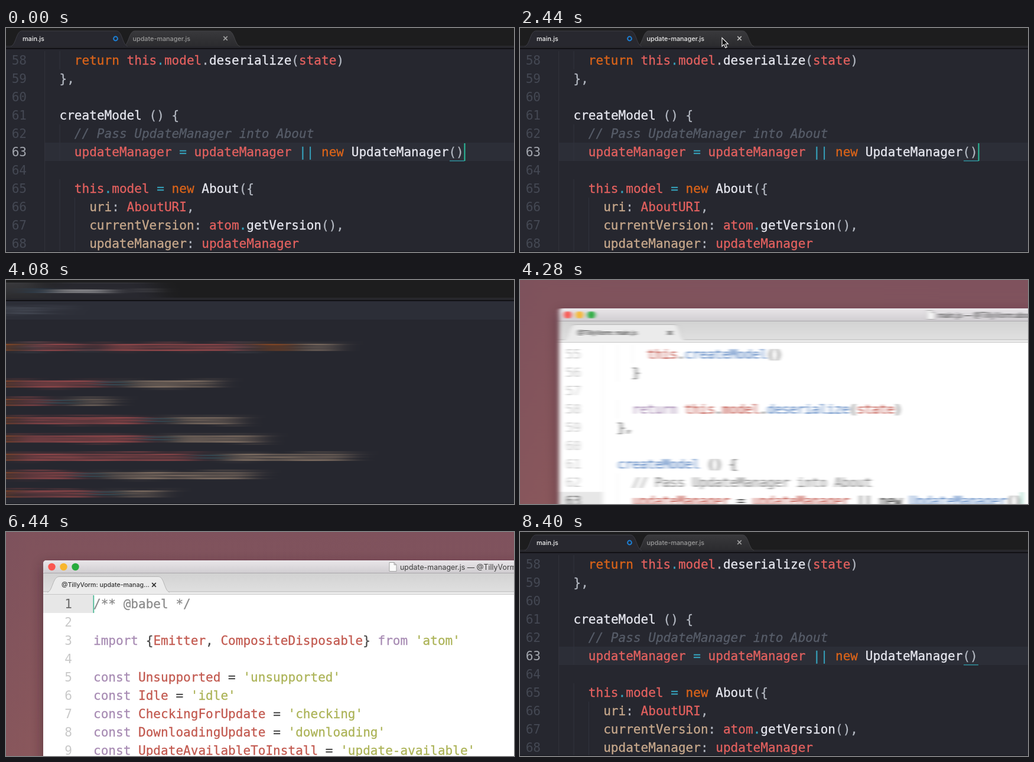
Animation of 860 by 379 pixels, one loop 8.44 s. Source, as an HTML page:

```html
<!DOCTYPE html>
<html lang="en">
<head>
<meta charset="utf-8">
<title>Following a collaborator between files</title>
<style>
  html, body { margin: 0; width: 100%; height: 100%; overflow: hidden; background: #26272f; }
  svg { display: block; width: 860px; height: 379px; }
  text { white-space: pre; }
  .code { font: 21.05px "DejaVu Sans Mono", monospace; stroke-width: .3px; }
  .ui { font-family: Inter, "Noto Sans", sans-serif; }
</style>
</head>
<body>
<svg id="stage" viewBox="0 0 860 379" xmlns="http://www.w3.org/2000/svg">
  <defs>
    <filter id="motion" filterUnits="userSpaceOnUse" x="-200" y="0" width="1260" height="379" color-interpolation-filters="sRGB">
      <feGaussianBlur id="blur" stdDeviation="0 0"/>
    </filter>
    <filter id="shadow" filterUnits="userSpaceOnUse" x="0" y="0" width="1100" height="460">
      <feGaussianBlur stdDeviation="10"/>
    </filter>
    <linearGradient id="wall">
      <stop offset="0" stop-color="#6b4e63"/><stop offset=".12" stop-color="#7a505d"/>
      <stop offset=".24" stop-color="#87565c"/><stop offset="1" stop-color="#86555e"/>
    </linearGradient>
    <linearGradient id="wallTop" x2="0" y2="1">
      <stop offset="0" stop-color="#6d4a5c" stop-opacity=".3"/><stop offset="1" stop-color="#8f5a5b" stop-opacity=".3"/>
    </linearGradient>
    <linearGradient id="title" x2="0" y2="1">
      <stop offset="0" stop-color="#e9e6e9"/><stop offset="1" stop-color="#cfccd0"/>
    </linearGradient>
    <linearGradient id="tabBar" x2="0" y2="1">
      <stop offset="0" stop-color="#d2d2d2"/><stop offset="1" stop-color="#e0e0e0"/>
    </linearGradient>
    <linearGradient id="idleTab" x2="0" y2="1">
      <stop offset="0" stop-color="#39393c"/><stop offset="1" stop-color="#2b2b2e"/>
    </linearGradient>
  </defs>
  <g id="lens"><g id="world">
    <g id="dark"></g>
    <g id="light"></g>
  </g></g>
  <path id="pointer" d="M0 0V14.5L3.4 11.4L5.8 17L8.3 15.9L5.9 10.5H10.4Z" fill="#111" stroke="#fff" stroke-width="1.1"/>
</svg>
<script>
const LOOP = 8440, PAN = 1400, PAN_TIME = 260, SHUTTER = 15;
const LEAVE = 4029, RETURN = 8006, CLICK = 2760, FOLLOW = 5600;
const CHAR = 12.667, ROW = 31;
const $ = id => document.getElementById(id);

function add(parent, tag, attrs = {}, text) {
  const el = document.createElementNS("http://www.w3.org/2000/svg", tag);
  for (const key in attrs) el.setAttribute(key, attrs[key]);
  if (text != null) el.textContent = text;
  return parent.appendChild(el);
}
const rect = (g, x, y, width, height, fill, more) => add(g, "rect", { x, y, width, height, fill, ...more });
const label = (g, x, y, size, fill, text, more) =>
  add(g, "text", { x, y, fill, "font-size": size, class: "ui", ...more }, text);
const cross = (g, x, y, stroke) =>
  add(g, "path", { d: `M${x - 3.3} ${y - 3.3}l6.6 6.6m0-6.6l-6.6 6.6`, stroke, "stroke-width": 1.7 });

// k keyword, n new, r variable, o operator, p punctuation, f function, c comment, s string or key
const darkTheme = { k: "#dc6419", n: "#dc6419", r: "#e4615f", o: "#36a3bd", p: "#b4b9c2", f: "#e8e9f1",
  c: "#575d69", s: "#c8a98c", number: "#444853", current: "#a3a6ae", guide: "#33353e", italic: true };
const lightTheme = { k: "#a78bb3", n: "#3c3c3c", r: "#c2594f", o: "#4a4a4a", p: "#4a4a4a", f: "#5b86c2",
  c: "#8b8b8b", s: "#acb357", number: "#c9c9c9", current: "#6a6a6a", guide: "#efefef" };

const mainFile = {
  55: "      ~rthis~o.~fcreateModel~p()",
  56: "    ~p}",
  57: "",
  58: "    ~kreturn ~rthis~o.~rmodel~p.~fdeserialize~p(~rstate~p)",
  59: "  ~p},",
  60: "",
  61: "  ~fcreateModel ~p() {",
  62: "    ~c// Pass UpdateManager into About",
  63: "    ~rupdateManager ~o= ~rupdateManager ~o|| ~nnew ~fUpdateManager~p()",
  64: "",
  65: "    ~rthis~o.~rmodel ~o= ~nnew ~fAbout~p({",
  66: "      ~suri~p: ~rAboutURI~p,",
  67: "      ~scurrentVersion~p: ~ratom~o.~fgetVersion~p(),",
  68: "      ~supdateManager~p: ~rupdateManager"
};
const constant = (name, value) => `~kconst ~r${name} ~o= ~s'${value}'`;
const updateFile = {
  1: "~c/** @babel */",
  2: "",
  3: "~kimport ~p{~rEmitter~p, ~rCompositeDisposable~p} ~kfrom ~s'atom'",
  4: "",
  5: constant("Unsupported", "unsupported"),
  6: constant("Idle", "idle"),
  7: constant("CheckingForUpdate", "checking"),
  8: constant("DownloadingUpdate", "downloading"),
  9: constant("UpdateAvailableToInstall", "update-available"),
  10: constant("UpToDate", "no-update-available"),
  11: constant("ErrorState", "error")
};

function drawCode(g, file, theme, { first, last, x, gutter, y, current }) {
  for (let n = first; n <= last; n++) {
    const base = y + (n - first) * ROW;
    const numberColor = n === current ? theme.current : theme.number;
    add(g, "text", { x: gutter, y: base, "text-anchor": "end", class: "code", fill: numberColor, stroke: "none" }, n);
    const [indent, ...tokens] = file[n].split("~");
    const depth = file === mainFile ? Math.max(1, indent.length / 2) : 0;
    for (let i = 0; i < depth; i++) rect(g, x + i * 2 * CHAR, base - 23, 1, ROW, theme.guide);
    const line = add(g, "text", { x: x + indent.length * CHAR, y: base, class: "code" });
    for (const token of tokens) {
      const kind = token[0], color = theme[kind];
      const span = add(line, "tspan", { fill: color, stroke: color }, token.slice(1));
      if (kind === "c" && theme.italic) span.setAttribute("font-style", "italic");
    }
  }
}

function darkTab(g, x, right, text, active) {
  add(g, "path", {
    d: `M${x} 31C${x + 9} 29 ${x + 9} 5 ${x + 19} 5H${right - 19}C${right - 9} 5 ${right - 9} 29 ${right} 31`,
    fill: active ? "#28282f" : "url(#idleTab)", stroke: active ? "#3d3d45" : "#434347", "stroke-width": 1
  });
  return label(g, text === "main.js" ? 28 : 214.5, 21.5, 10.8, active ? "#f4f4f4" : "#9b9b9b", text,
    { "font-weight": 500 });
}

function darkScene(onMain) {
  const g = add($("dark"), "g");
  rect(g, 0, 0, 1080, 379, "#26272f");
  rect(g, 0, 0, 1080, 35, "#1d1d1e");
  rect(g, 0, 30.5, 1080, 1, "#38383f");
  rect(g, 0, 31.5, 1080, 2.5, "#26262c");
  rect(g, 0, 34, 1080, 1.6, "#0d0d0f");
  const tabs = [["main.js", 8, 206, onMain], ["update-manager.js", 199, 396, !onMain]];
  if (!onMain) tabs[0][2] = 204;
  const names = {};
  for (const [text, x, right, active] of tabs.sort((a, b) => a[3] - b[3]))
    names[text] = darkTab(g, x, right, text, active);
  add(g, "circle", { cx: 185.5, cy: 18, r: 3.4, fill: "none", stroke: "#1c80d6", "stroke-width": 2 });
  const close = cross(g, 371.5, 17.5, onMain ? "#9b9b9b" : "#dadada");
  rect(g, onMain ? 65 : 0, onMain ? 194 : 36, 1080, 31, "#2c2e37");
  drawCode(g, onMain ? mainFile : updateFile, darkTheme, onMain
    ? { first: 58, last: 68, x: 65.2, gutter: 35, y: 62, current: 63 }
    : { first: 1, last: 11, x: 78, gutter: 47.7, y: 58, current: 1 });
  if (onMain) rect(g, 751, 224, 25, 1.5, "#2f8f9b");
  const caret = onMain ? rect(g, 775.5, 195, 2, 30, "#2bbd9b") : rect(g, 77.5, 36, 2, 30, "#2bbd9b");
  rect(g, 0, 377.7, 1080, 1.3, "#1b1c22");
  return { g, caret, close, name: names["update-manager.js"] };
}

function lightScene(onMain) {
  const g = add($("light"), "g");
  const tabText = onMain ? "main.js" : "update-manag...";
  const titleX = onMain ? 704 : 667;
  rect(g, -320, 0, 1500, 379, "url(#wall)");
  rect(g, -320, 0, 1500, 379, "url(#wallTop)");
  rect(g, 63, 56, 1100, 400, "#2a1420", { opacity: .5, filter: "url(#shadow)" });
  rect(g, 63, 48, 1100, 400, "url(#title)", { rx: 5 });
  rect(g, 63, 48, 1100, 22, "url(#title)", { rx: 5 });
  rect(g, 63, 69, 1100, 1.2, "#aaa7ab");
  rect(g, 63, 70, 1100, 32, "url(#tabBar)");
  rect(g, 63, 101, 1100, 5, "#ececec");
  rect(g, 63, 100.5, 1100, 1, "#b9b9b9");
  add(g, "path", { d: "M70 102C79 100 79 75.5 90 75.5H258C268 75.5 268 100 277 102", fill: "#ebebeb", stroke: "#b5b5b5" });
  rect(g, 63, 105, 1100, 1, "#c6c6c6");
  rect(g, 63, 106, 1100, 273, "#fff");
  ["#fa5650", "#f8b62d", "#27ab3c"].forEach((fill, i) =>
    add(g, "circle", { cx: 77.5 + 20 * i, cy: 59, r: 6.2, fill }));
  add(g, "path", { d: `M${titleX - 18} 51.5h8l4 4v11h-12zm8 0v4h4`, fill: "#fafafa", stroke: "#9a9a9a", "stroke-width": .9 });
  label(g, titleX, 64, 12.4, "#3d3d3d", `${onMain ? "main" : "update-manager"}.js — @TillyVorm:about`);
  label(g, 94, 93, 10.6, "#333", `@TillyVorm: ${tabText}`, { "font-weight": 500 });
  cross(g, 250.5, 89.5, "#333");
  const gutterEnd = onMain ? 136.3 : 148;
  rect(g, 63, onMain ? 358.5 : 106, gutterEnd - 63, 31, "#e7e7e7");
  drawCode(g, onMain ? mainFile : updateFile, lightTheme, onMain
    ? { first: 55, last: 63, x: 136.3, gutter: 99.7, y: 133, current: 63 }
    : { first: 1, last: 9, x: 148, gutter: 112, y: 129, current: 1 });
  rect(g, onMain ? 845.5 : 147.5, onMain ? 359 : 107, 1.7, 30, "#46b893");
  return g;
}

const darkMain = darkScene(true), darkUpdate = darkScene(false);
const lightMain = lightScene(true), lightUpdate = lightScene(false);
$("light").setAttribute("transform", `translate(${PAN} 0)`);

const clamp = v => Math.min(1, Math.max(0, v));
const ease = v => (1 - Math.cos(Math.PI * clamp(v))) / 2;
const panAt = t => PAN * (ease((t - LEAVE) / PAN_TIME) - ease((t - RETURN) / PAN_TIME));
const show = (el, on) => el.setAttribute("display", on ? "inline" : "none");

function render(t) {
  const pan = panAt(t);
  const sigma = Math.abs(panAt(t + SHUTTER / 2) - panAt(t - SHUTTER / 2)) / Math.sqrt(12);
  $("world").setAttribute("transform", `translate(${-pan} 0)`);
  $("blur").setAttribute("stdDeviation", `${sigma} 0`);
  if (sigma > .3) $("lens").setAttribute("filter", "url(#motion)");
  else $("lens").removeAttribute("filter");

  const onMain = t < CLICK || t > 6000;
  show($("dark"), pan < 1080);
  show($("light"), pan > 200);
  show(darkMain.g, onMain);
  show(darkUpdate.g, !onMain);
  show(lightMain, t < FOLLOW);
  show(lightUpdate, t >= FOLLOW);

  const blinkOn = t % 800 < 400;
  show(darkMain.caret, blinkOn);
  show(darkUpdate.caret, (t - CLICK) % 800 < 400);

  // The pointer rises to the second tab and rests there.
  const move = ease((t - 1300) / 1000);
  const px = 420 - 78 * move, py = 400 - 383.5 * move;
  const hover = py < 33 && t < LEAVE;
  $("pointer").setAttribute("transform", `translate(${px} ${py})`);
  show($("pointer"), t > 1300 && t < LEAVE);
  darkMain.name.setAttribute("fill", hover ? "#ececec" : "#9b9b9b");
  darkMain.close.setAttribute("stroke", hover ? "#b5b5b5" : "#9b9b9b");
}

const start = performance.now();
function tick() {
  render((performance.now() - start) % LOOP);
  requestAnimationFrame(tick);
}
tick();
</script>
</body>
</html>
```
